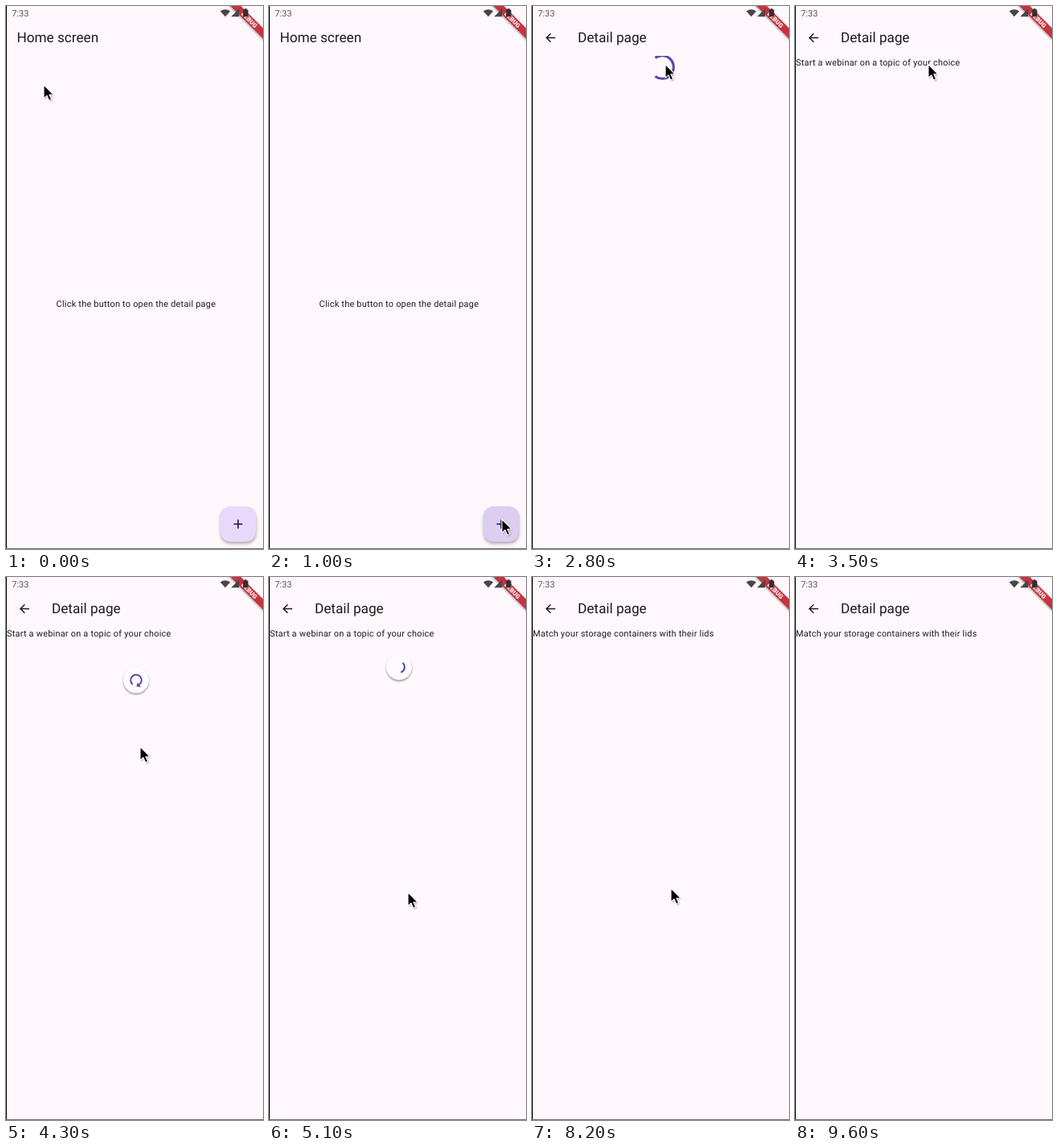
An HTML page for the animation above (10000 ms loop, 320x675 px).

```html
<!DOCTYPE html>
<html lang="en">
<head>
<meta charset="utf-8">
<title>Pull to refresh</title>
<style>
  html, body { margin: 0; width: 100%; height: 100%; overflow: hidden; background: #fef7fc; }
  svg { display: block; width: 320px; height: 675px; }
  text { font-family: Roboto, sans-serif; fill: #1d1b20; text-rendering: geometricPrecision; white-space: pre; }
  .title { font-size: 17.2px; }
  .body { font-size: 10.95px; letter-spacing: .22px; }
  .clock { font-size: 11px; fill: #57535a; }
  .debug { font-size: 7.6px; font-weight: 900; fill: #fff; text-anchor: middle; }
  .page { fill: #fef7fc; }
  .arc { fill: none; stroke: #5a47a0; }
</style>
</head>
<body>
<svg viewBox="0 0 320 675">
  <defs>
    <clipPath id="list"><rect x="0" y="62" width="320" height="613"/></clipPath>
    <filter id="soft" x="-50%" y="-50%" width="200%" height="200%"><feGaussianBlur stdDeviation="2"/></filter>
    <filter id="faint" x="-50%" y="-50%" width="200%" height="200%"><feGaussianBlur stdDeviation="1.1"/></filter>
  </defs>
  <rect class="page" width="320" height="675"/>

  <g id="home">
    <rect class="page" width="320" height="675"/>
    <text class="title" x="13.4" y="45.4">Home screen</text>
    <text class="body" x="62.6" y="374">Click the button to open the detail page</text>
    <rect x="267.5" y="625" width="43.5" height="43" rx="12" fill="#000" opacity=".36" filter="url(#soft)"/>
    <rect id="fab" x="267" y="622" width="44" height="44" rx="12.5" fill="#e8d9fb"/>
    <path d="M283.5 644h11M289 638.500v11" stroke="#21104d" stroke-width="1.6"/>
  </g>

  <rect id="scrim" width="320" height="675" fill="#000"/>

  <g id="detail">
    <rect class="page" width="320" height="675"/>
    <path d="M29 39.500H18.200M23.300 34.200L18 39.500L23.300 44.800" fill="none" stroke="#1d1b20" stroke-width="1.5"/>
    <text class="title" x="56.900" y="45.400">Detail page</text>
    <text class="body" id="idea" x="1" y="73.500"></text>
    <g clip-path="url(#list)">
      <path class="arc" id="loader" stroke-width="3.100"/>
      <g id="disc">
        <circle cy="1.600" r="16" opacity=".4" filter="url(#faint)"/>
        <circle r="16" fill="#fefbfe"/>
        <path class="arc" id="ring" stroke-width="2"/>
        <path id="head" d="M-3.600 0H3.600L0 4.200Z" fill="#5a47a0"/>
      </g>
    </g>
  </g>

  <g id="frame">
    <rect width="1" height="675" fill="#08070a"/>
    <rect y="674" width="320" height="1" fill="#75686f"/>
    <g transform="translate(320 0) rotate(45)">
      <rect x="-42" y="20" width="84" height="10" opacity=".3" filter="url(#faint)"/>
      <rect x="-42" y="19.500" width="84" height="9.200" fill="#c5343f"/>
      <text class="debug" x="0" y="26.800">DEBUG</text>
    </g>
    <text class="clock" x="7.200" y="13">7:33</text>
    <g fill="#48454b">
      <path d="M266.800 6.500Q273 1.800 279.200 6.500L273 13.300Z"/>
      <path d="M280.300 13.200L290.300 3.300V13.200Z"/>
      <path d="M295.200 4.500H297V3.300H299.700V4.500H301.500V13.300H295.200Z" fill="#3b2a30"/>
    </g>
  </g>

  <g id="cursor">
    <path d="M1 2V18L5 14.500L8 21L11 19.600L8 13.500H13Z" opacity=".35" filter="url(#faint)"/>
    <path d="M0 0V16.800L3.900 13.300L6.700 19.600L9.700 18.200L6.900 12.200H12Z" stroke="#fff" stroke-width="1.100" stroke-linejoin="round"/>
  </g>
</svg>
<script>
const LOOP = 10000, STEP = 100;
const OPEN = 1000, LOADED = 3500, DRAG = 4050, RELEASE = 4600, SPIN = 4750, REFRESHED = 7200, GONE = 8400;
const IDEAS = ['Start a webinar on a topic of your choice', 'Match your storage containers with their lids'];

// time, x, y, and whether the move up to here is eased
const PATH = [
  [0, 47, 98], [50, 47, 98], [800, 290, 638, 1],
  [1680, 290, 638], [2200, 166, 72.500, 1],
  [DRAG, 166, 72.500], [4300, 167, 211], [RELEASE, 173, 392],
  [8150, 173, 392], [8200, 173, 387]
];

const $ = id => document.getElementById(id);
const clamp = v => Math.min(1, Math.max(0, v));
const span = (t, a, b) => clamp((t - a) / (b - a));
const mix = (a, b, k) => a + (b - a) * k;
const smooth = k => k * k * (3 - 2 * k);
const show = (id, on) => $(id).style.display = on ? '' : 'none';

function bezier(x1, y1, x2, y2) {
  const at = (a, b, s) => 3 * a * s * (1 - s) ** 2 + 3 * b * s * s * (1 - s) + s ** 3;
  return x => {
    let lo = 0, hi = 1;
    for (let i = 0; i < 24; i++) {
      const mid = (lo + hi) / 2;
      if (at(x1, x2, mid) < x) lo = mid; else hi = mid;
    }
    return at(y1, y2, lo);
  };
}
const fastOutSlowIn = bezier(.4, 0, .2, 1);
const zoomIn = bezier(.05, 0, .133, .06);
const zoomOut = bezier(.208, .82, .25, 1);
const zoom = k => k < 1 / 6 ? .4 * zoomIn(k * 6) : .4 + .6 * zoomOut((k - 1 / 6) * 1.2);

function arc(cx, cy, r, start, sweep) {
  const point = deg => {
    const a = deg * Math.PI / 180;
    return `${(cx + r * Math.cos(a)).toFixed(2)} ${(cy + r * Math.sin(a)).toFixed(2)}`;
  };
  return `M${point(start)}A${r} ${r} 0 ${sweep > 180 ? 1 : 0} 1 ${point(start + sweep)}`;
}

// Indeterminate progress: start angle and sweep after some milliseconds
function spin(ms) {
  const phase = ms % 1333 / 1333;
  const head = fastOutSlowIn(span(phase, 0, .5));
  const tail = fastOutSlowIn(span(phase, .5, 1));
  const start = -90 + 270 * tail + 360 * (ms % 2222 / 2222) + 90 * phase;
  return [start, Math.max(270 * (head - tail), .5)];
}

function cursorAt(t) {
  const i = PATH.findIndex(p => p[0] > t);
  if (i < 0) return PATH[PATH.length - 1].slice(1, 3);
  const a = PATH[i - 1], b = PATH[i];
  const raw = span(t, a[0], b[0]), k = b[3] ? smooth(raw) : raw;
  return [mix(a[1], b[1], k), mix(a[2], b[2], k)];
}

const scaleAbout = s => `translate(160 337.500) scale(${s}) translate(-160 -337.500)`;

function drawPages(t) {
  const k = span(t, OPEN, OPEN + 300), z = zoom(k);
  show('home', k < 1);
  show('detail', k > 0);
  show('scrim', k > 0 && k < 1);
  $('home').setAttribute('transform', scaleAbout(mix(1, 1.05, z)));
  $('detail').setAttribute('transform', scaleAbout(mix(.85, 1, z)));
  $('detail').setAttribute('opacity', span(k, .125, .25));
  $('scrim').setAttribute('opacity', .6 * span(k, .2075, .4175));
  $('fab').setAttribute('fill', t >= 800 ? '#dccdf1' : '#e8d9fb');
}

function drawLoader(t) {
  show('loader', t >= OPEN && t < LOADED);
  $('loader').setAttribute('d', arc(162, 76, 14.300, ...spin(Math.max(0, t - OPEN))));
  $('idea').textContent = t < LOADED ? '' : IDEAS[t < REFRESHED ? 0 : 1];
}

function drawDisc(t, y) {
  const visible = t > DRAG && t < REFRESHED + 200;
  show('disc', visible);
  if (!visible) return;
  const pull = 1.5 * clamp((y - 72.500 - 14) / 151);
  const factor = t < RELEASE ? pull : mix(1.5, 1, smooth(span(t, RELEASE, SPIN)));
  const scale = 1 - span(t, REFRESHED, REFRESHED + 200);
  $('disc').setAttribute('transform', `translate(162 ${43 + 69 * factor}) scale(${scale})`);

  const dragging = t < SPIN;
  show('head', dragging);
  if (dragging) {
    const sweep = 285 * clamp(factor), end = 55 + 100 * (factor - 1.240);
    $('ring').setAttribute('d', arc(0, 0, 6.800, end - sweep, sweep));
    $('head').setAttribute('transform', `rotate(${end}) translate(6.800 0)`);
  } else {
    const [start, sweep] = spin(t - SPIN + 563);
    $('ring').setAttribute('d', arc(0, 0, 6.800, start + 42, sweep));
  }
  const alpha = clamp(factor);
  $('ring').setAttribute('opacity', alpha);
  $('head').setAttribute('opacity', alpha);
}

function draw(now) {
  const t = Math.floor(now % LOOP / STEP) * STEP;
  const [x, y] = cursorAt(t);
  drawPages(t);
  drawLoader(t);
  drawDisc(t, y);
  show('cursor', t < GONE);
  $('cursor').setAttribute('transform', `translate(${x} ${y})`);
}

const begin = performance.now();
function tick() {
  draw(performance.now() - begin);
  requestAnimationFrame(tick);
}
tick();
</script>
</body>
</html>
```
